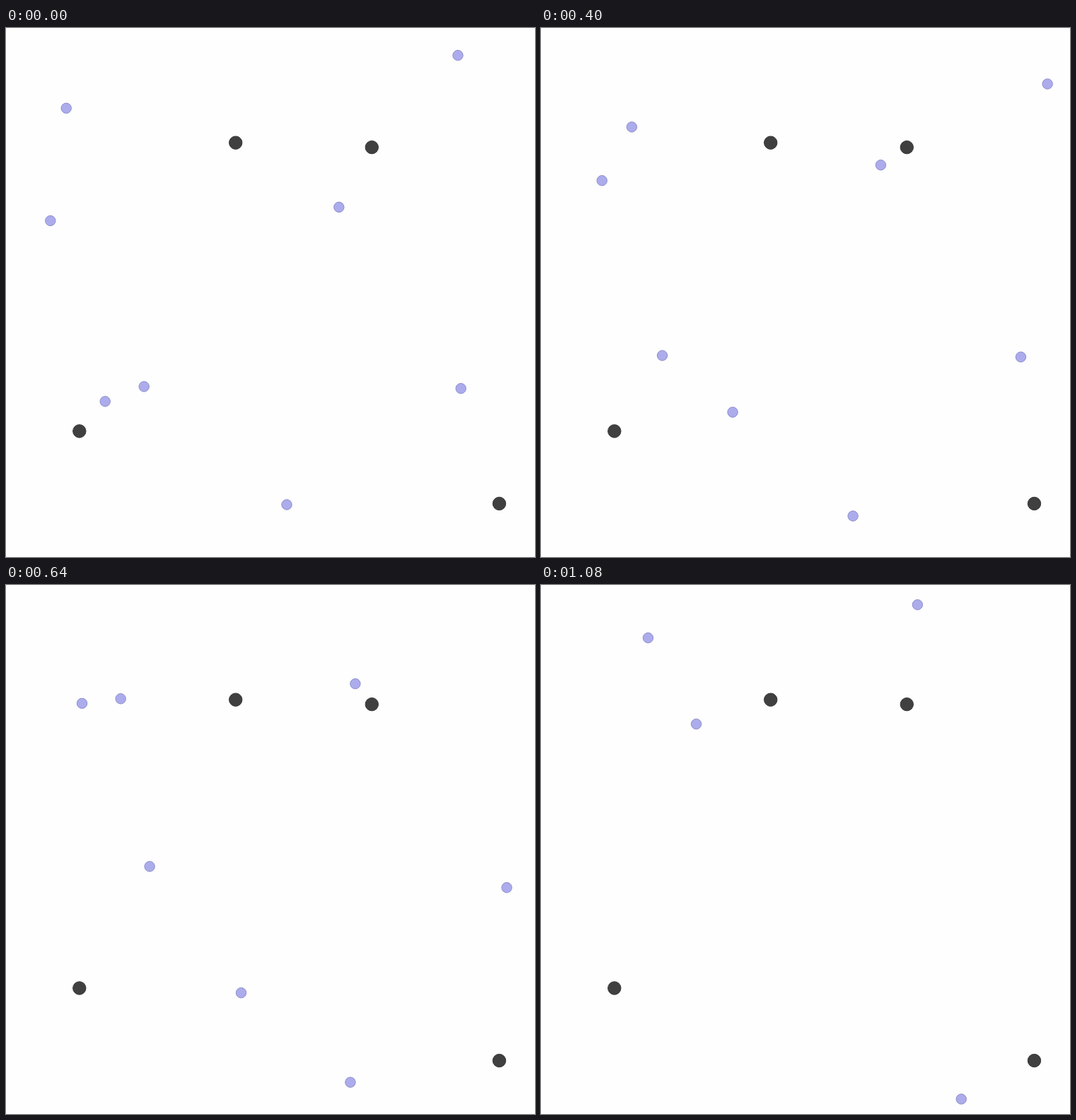
Recreate the animation shown at these times as an HTML page with a canvas. Size 748 by 748 pixels, loop 1.12 s.

```html
<!DOCTYPE html>
<html lang="en">
<head>
<meta charset="utf-8">
<title>Moving dots</title>
<style>
  html, body { margin: 0; width: 100%; height: 100%; overflow: hidden; background: #fefefe; }
  canvas { display: block; }
</style>
</head>
<body>
<canvas id="stage" width="748" height="748"></canvas>
<script>
const ctx = document.getElementById('stage').getContext('2d');
const LOOP = 1120, STEP = 40;
const UNIT = 160;   // ms per unit of travel at full speed
const RAMP = 137;   // time constant of the speed-up, in ms

const anchors = [[324.7, 162.2], [517.3, 168.7], [103.8, 570], [697.5, 672.5]];

// Start point, velocity and bend of each path; `end` is when the dot is removed
const movers = [
  { start: [639, 38.7], vel: [45.4, 19.8], bend: [-0.7, 1.9] },
  { start: [85.2, 113.4], vel: [25.6, 15.7], bend: [-0.51, -0.29] },
  { start: [62.8, 272.5], vel: [12.8, -32.2], bend: [0.35, -0.17] },
  { start: [470.8, 253.3], vel: [3.5, -32.5], bend: [1.15, -0.9] },
  { start: [140.2, 528], vel: [15.9, -33.2], bend: [1.15, -2.27], end: 800 },
  { start: [195.2, 507], vel: [44.2, 19.6], bend: [-0.45, 0.65], end: 800 },
  { start: [643.2, 509.7], vel: [20.2, -25.5], bend: [0, 0] },
  { start: [397, 674], vel: [22, 9.3], bend: [1.87, -0.07] }
];

// Shared travel: almost at rest at first, then settling to full speed
const travel = t => (t - 0.93 * RAMP * (1 - Math.exp(-t / RAMP))) / UNIT;

function dot([x, y], r, fill, stroke) {
  ctx.beginPath();
  ctx.arc(x, y, r, 0, 2 * Math.PI);
  ctx.fillStyle = fill;
  ctx.fill();
  ctx.strokeStyle = stroke;
  ctx.stroke();
}

function draw(now) {
  const t = Math.floor(now % LOOP / STEP) * STEP, s = travel(t);
  ctx.fillStyle = '#fefefe';
  ctx.fillRect(0, 0, 748, 748);
  for (const p of anchors) dot(p, 9.2, '#404040', '#363636');
  for (const { start, vel, bend, end = LOOP } of movers) {
    if (t >= end) continue;
    const pos = start.map((p, i) => p + vel[i] * s + bend[i] * s * s);
    dot(pos, 7.2, '#acacec', '#8c8ccc');
  }
  requestAnimationFrame(draw);
}
draw(0);
</script>
</body>
</html>
```
